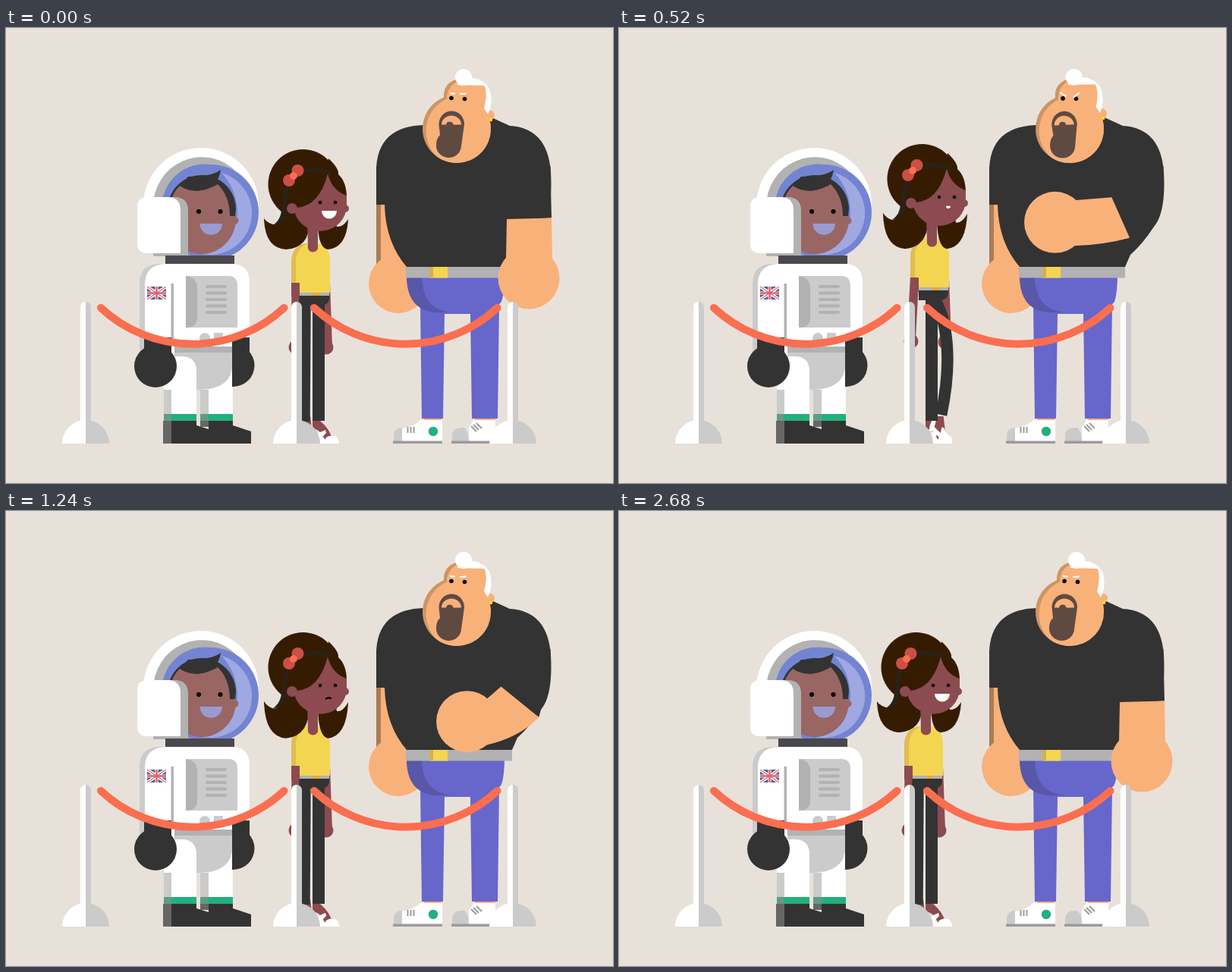
An HTML page that plays this animation: 800 px wide and 600 px high, repeating every 4 s.

```html
<!DOCTYPE html>
<html lang="en">
<head>
<meta charset="utf-8">
<title>Waiting in line</title>
<style>
html, body { margin: 0; width: 100%; height: 100%; overflow: hidden; background: #e8e1da; }
svg { display: block; width: 800px; height: 600px; }
.dark { fill: #333; } .white { fill: #fff; } .pale { fill: #cbcbcb; } .grey { fill: #b2b2b2; }
.tan { fill: #f9b17a; } .brown { fill: #8c4b50; } .hair { fill: #351c00; } .jeans { fill: #6766cb; }
.line { fill: none; }
</style>
</head>
<body>
<svg viewBox="0 0 800 600">
<defs>
  <clipPath id="flagClip"><path d="M186 341h25v17h-25z"/></clipPath>
  <clipPath id="faceClip"><circle cx="594" cy="133" r="45"/></clipPath>
  <clipPath id="visorClip"><path d="M173 150H340V301H173z"/></clipPath>
  <g id="post">
    <path class="white" d="M-31 548A31 31 0 0 1 0 517V548z"/>
    <path class="pale" d="M0 517A31 31 0 0 1 31 548H0z"/>
    <path class="white" d="M-7 548V368A7 7 0 0 1 0 361V548z"/>
    <path class="pale" d="M0 361A7 7 0 0 1 7 368V548H0z"/>
  </g>
  <path id="rope" class="line" d="M0 369A176.500 176.500 0 0 0 241.500 369" stroke="#fb6e50" stroke-width="10" stroke-linecap="round"/>
</defs>

<g id="astronaut">
  <g clip-path="url(#visorClip)">
    <circle class="white" cx="257" cy="234" r="76"/>
    <path class="grey" d="M194 236A64 65 0 0 1 303 189L270 301H194z"/>
    <circle cx="270" cy="243" r="63" fill="#7384d2"/>
    <circle cx="262" cy="236" r="56.500" fill="#7384d2"/>
    <path d="M284 191A55 55 0 0 1 254 297Q304 285 305 243Q304 212 284 191z" fill="#a0a8e2"/>
    <circle class="dark" cx="258" cy="239" r="45"/>
    <g fill="#996663">
      <path d="M213 254Q214 222 229 208Q252 222 279 206Q295 222 295 248H303A45 47 0 0 1 213 254z"/>
      <circle cx="302" cy="254" r="4.500"/>
    </g>
    <path class="dark" d="M240 196Q272 196 283 187Q281 199 274 207Q251 222 229 208z"/>
    <circle cx="254" cy="242" r="3"/><circle cx="282.500" cy="242" r="3"/>
    <path d="M255.500 258H285A14.500 14.500 0 0 1 255.500 258z" fill="#9a9bd0"/>
  </g>
  <path class="grey" d="M205 223H222Q240 223 240 241V301H205z"/>
  <path class="white" d="M186 223H215Q230 224 230 241V297H186Q173 297 173 284V236Q173 223 186 223z"/>
  <path d="M210 300H301V311H210z" fill="#49484c"/>
  <path class="pale" d="M208 311H200Q176 313 176 337V425H208z"/>
  <path class="white" d="M210 311H300Q321 313 321 335V420H298V432H183V337Q184 312 210 311z"/>
  <path class="grey" d="M217.500 337H221V410H217.500z"/>
  <g clip-path="url(#flagClip)">
    <path d="M186 341h25v17h-25z" fill="#525c93"/>
    <path d="M186 341l25 17M211 341l-25 17M198.500 341v17M186 349.500h25" stroke="#fff" stroke-width="4.200"/>
    <path d="M186 341l25 17M211 341l-25 17" stroke="#e0606b" stroke-width="1.200"/>
    <path d="M198.500 341v17M186 349.500h25" stroke="#e0606b" stroke-width="2.400"/>
  </g>
  <path class="pale" d="M237 327H293Q305 327 305 340V395H237z"/>
  <path class="grey" d="M237 327Q252 329 252 343V382Q252 395 237 395z"/>
  <path d="M265 341h24m-24 8.500h24m-24 8.500h24m-24 8.500h24m-24 8.500h24" stroke="#b2b2b2" stroke-width="4" stroke-linecap="round"/>
  <circle class="pale" cx="262" cy="409" r="7"/>
  <path class="pale" d="M274 402h12v12h-12z"/>
  <path class="grey" d="M222 420H298V428H222z"/>
  <path class="pale" d="M222 428H298V444Q296 475 265 477H222z"/>
  <path class="white" d="M208 433H233Q251 434 251 453V510H208zM256 477Q297 476 299 444V510H256z"/>
  <path class="pale" d="M208 477H218V510H208zM256 477H267V510H256z"/>
  <path d="M208 509H251V518H208zM256 509H299V518H256z" fill="#22b07d"/>
  <path d="M208 509H218V518H208zM256 509H267V518H256z" fill="#5f9c85"/>
  <path class="dark" d="M207 518H251V524L267 529V548H207zM256 518H299V524L323 532V548H267V526L256 526z"/>
  <path d="M207 518H218V548H207zM256 518H267V526L256 526z" fill="#666"/>
  <path class="dark" d="M182 408H218V440H182zM298 408H321V440H298z"/>
  <circle class="dark" cx="197" cy="446" r="28"/>
  <path class="dark" d="M298 417H299.500A28 28 0 0 1 299.500 473H298z"/>
</g>

<g id="woman">
  <g id="rightArm"><path class="brown" d="M418 336H427L430 420H415z"/><circle class="brown" cx="422" cy="421" r="9.500"/></g>
  <path id="leftArm" class="line" stroke="#8c4b50" stroke-width="11.500"/>
  <circle id="leftHand" class="brown" r="9.500"/>
  <path class="brown" d="M404 518H414Q428 530 430 543L421 545Q416 530 404 528z"/>
  <path class="white" d="M408 548V541Q409 535 414 533L421 530L422 534L416 540Q424 543 425 548z"/>
  <path class="white" d="M421 548V541Q426 536 434 538Q439 541 439 548z"/>
  <g id="crossFoot">
    <path class="brown" d="M387 512H401L404 538L400 545L391 530z"/>
    <path class="white" d="M382 531Q383 520 388 515H392L389 526L397 534L399 526L402 528Q405 536 412 540V548H399Q394 535 385 531z"/>
  </g>
  <path class="dark" d="M404 355H420V518H404z"/>
  <path id="crossLeg" class="line" stroke="#333" stroke-width="15.500"/>
  <g id="womanTop">
    <path class="dark" d="M387 352H426V358Q424 366 414 366H387z"/>
    <path fill="#f4d552" d="M376 349V308Q377 286 397 284H411Q426 287 427 306V349z"/>
    <path fill="#dfbd51" d="M376 336V308Q377 286 397 284Q382 292 382 308V349H376z"/>
    <path class="brown" d="M376 336H387V354H376z"/>
    <path class="grey" d="M387 349H426V353H387z"/><path d="M406 349h7v4h-7z" fill="#f5a623"/>
    <circle class="hair" cx="391.500" cy="206" r="46"/>
    <path id="curls" class="hair" d="M368 215Q368 260 352 259Q344 257 340 251Q341 290 369 292Q400 290 400 255H411Q411 290 424 292Q449 290 451 252Q444 263 436 262L425 210z"/>
    <path class="hair" d="M425 172Q439 185 438 193Q449 203 449 224L420 225z"/>
    <path class="brown" d="M397 250H411V291A7 7 0 0 1 398 291z"/>
    <path class="brown" d="M383 237Q413 235 424 192Q429 214 449 221V235A35 34 0 0 1 381 245z"/>
    <circle class="brown" cx="377" cy="238" r="7"/><circle class="brown" cx="447" cy="238" r="5"/>
    <path class="line" d="M367 244Q364 215 380 195Q402 181 427 192" stroke="#29211b" stroke-width="5"/>
    <path d="M363 240H369Q369 259 352 260Q362 253 363 240z" fill="#29211b"/>
    <g fill="#cb4f44"><circle cx="384.500" cy="188" r="8"/><circle cx="373" cy="201" r="8"/></g>
    <circle cx="379" cy="195" r="5" fill="#fb6e50"/>
    <circle cx="414" cy="230" r="2.300"/><circle cx="434" cy="230" r="2.300"/>
    <path id="smile" class="white" d="M-10 -1H10A10 10.500 0 0 1 -10 -1z"/>
    <ellipse id="gasp" cx="425.500" cy="246.500" rx="3.800" ry="3.400"/>
    <path id="frown" class="line" d="M421 248Q425 245 429 247.500" stroke="#000" stroke-width="2"/>
  </g>
</g>

<g id="bouncer">
  <path class="tan" d="M488 233H540V337H488z"/><path d="M488 233H494V312H488z" fill="#a97c55"/>
  <circle class="tan" cx="517" cy="337" r="39"/>
  <path class="tan" d="M551 513h23v6h-23zM618 513h27v6h-27z"/>
  <path class="jeans" d="M528 329H657Q656 362 650 364L648 515H614L612 377H578L576 515H548L546 366Q530 355 528 329z"/>
  <path d="M528 329H548Q549 372 588 375H577Q529 378 528 329z" fill="#5857a8"/>
  <path class="dark" d="M488 233V184Q491 130 550 128L640 118L664 129Q714 132 718 190Q721 243 705 262Q690 285 674 299L667 315H528Q500 282 499 233z"/>
  <path class="grey" d="M527 315H667V329.500H527z"/>
  <path d="M558 315h24v14.500h-24z" fill="#f4d552"/><path d="M558 315h5v14.500h-5z" fill="#d2b04b"/>
  <path class="white" d="M522 545V528Q538 525 546 517H575V545zM610 545V527L616 517H645V545z"/>
  <path class="pale" d="M511 545V537Q512 527 522 527V545zM588 545V537Q589 527 600 527H604Q610 532 610 545z"/>
  <path d="M510 544.500h65v3.500h-65zM587 544.500h51v3.500h-51z" fill="#9b9b9f"/>
  <path d="M529.500 526v8m4 -8v8m4 -8v8M613 525l7 7m-4 -9l7 7m-3 -9l7 7" stroke="#9b9b9f" stroke-width="2"/>
  <circle cx="563" cy="532" r="6.200" fill="#22b07d"/>
  <g id="head">
    <path d="M577 108V88Q578 70 600 66L612 110z" fill="#cc9563"/>
    <circle cx="594" cy="133" r="45" fill="#cc9563"/>
    <circle class="tan" cx="600" cy="136" r="46.500" clip-path="url(#faceClip)"/>
    <path class="tan" d="M581 105V90Q583 74 600 68H626Q638 85 636 118z"/>
    <circle class="tan" cx="637.500" cy="115" r="6.500"/>
    <path class="white" d="M594 75L603 66Q627 63 637 80Q643 98 635 114L630 106Q635 88 631 76z"/>
    <circle class="white" cx="603" cy="65" r="11"/>
    <circle cx="639" cy="121" r="2.200" fill="#ffe100"/>
    <path d="M570.500 127A16.700 17.500 0 0 1 604 127L600 156A16.500 16 0 0 1 567 154Q567 146 572 141z" fill="#5f4a42"/>
    <path class="tan" d="M574 127.500A13 12 0 0 1 600 127.500H589.500A4.800 4.800 0 0 0 580 127.500z"/>
    <circle cx="587" cy="92.500" r="2.800"/><circle cx="604.500" cy="93.500" r="2.800"/>
    <path id="brows" class="line" stroke="#fff" stroke-width="2.200"/>
  </g>
  <path id="sleeve" class="dark"/>
  <path id="forearm" class="tan"/>
  <circle id="fist" class="tan" r="40.500"/>
</g>

<use href="#post" x="105"/><use href="#post" x="383"/><use href="#post" x="668"/>
<use href="#rope" x="125"/><use href="#rope" x="406"/>
</svg>
<script>
const LOOP = 4000, STEP = 40;
const el = id => document.getElementById(id);
const set = (id, attrs) => { for (const k in attrs) el(id).setAttribute(k, attrs[k]); };
const show = (id, visible) => { el(id).style.display = visible ? '' : 'none'; };
const mix = (a, b, f) => a + (b - a) * f;
const mixPoint = (a, b, f) => [mix(a[0], b[0], f), mix(a[1], b[1], f)];
const add = (a, b) => [a[0] + b[0], a[1] + b[1]];
const ramp = (t, from, to) => {
  const x = Math.min(1, Math.max(0, (t - from) / (to - from)));
  return x * x * (3 - 2 * x);
};
// Eases from 0 to 1, holds, then eases back to 0.
const outAndBack = (t, a, b, c, d) => ramp(t, a, b) - ramp(t, c, d);

function poseWoman(t) {
  const lean = outAndBack(t, 230, 530, 970, 1180);
  const P = (rest, moved) => mixPoint(rest, moved, lean);
  const shift = `translate(${8 * lean} ${-7 * lean})`;
  set('womanTop', { transform: shift });
  set('rightArm', { transform: shift });
  const hand = P([382, 421], [385, 413]);
  set('leftArm', { d: `M${P([382, 330], [390, 323])}L${hand}` });
  set('leftHand', { cx: hand[0], cy: hand[1] });

  // The curls droop for a moment after each move.
  const droop = outAndBack(t, 320, 440, 460, 660) + outAndBack(t, 1050, 1210, 1220, 1420);
  set('curls', { transform: `translate(0 252) scale(1 ${1 + .2 * droop}) translate(0 -252)` });

  const cross = outAndBack(t, 240, 540, 970, 1140);
  const C = (rest, crossed) => mixPoint(rest, crossed, cross);
  set('crossLeg', {
    d: `M${P([394, 354], [412, 351])}C${C([394, 400], [436, 385])} ${C([393, 460], [439, 445])} ${C([393, 519], [425, 510])}`
  });
  set('crossFoot', { transform: `translate(${27 * cross} 0)` });

  const smile = t < 1000 ? 1 - ramp(t, 450, 560) : Math.min(1, Math.max(0, (t - 2520) / 160));
  show('smile', smile > 0);
  set('smile', { transform: `translate(426 242) scale(${smile})` });
  show('gasp', t >= 540 && t < 1160);
  show('frown', t >= 1160 && t < 2560);
}

function poseBouncer(t) {
  const turn = t < 900 ? ramp(t, 370, 680) : 1 - ramp(t, 1010, 1230);
  set('head', { transform: `rotate(${-6 * turn} 594 133)` });
  const anger = outAndBack(t, 300, 500, 1040, 1230);
  const B = (calm, angry) => mixPoint(calm, angry, anger);
  set('brows', {
    d: `M${B([585, 86], [584, 84.5])}L${B([592, 86.5], [591.5, 90])}M${B([598, 87], [601, 92])}L${B([606.5, 86.5], [609, 86])}`
  });

  const bend = outAndBack(t, 240, 594, 1100, 1440);
  const A = (rest, bent) => mixPoint(rest, bent, bend);
  const wristTurn = Math.min(1, bend * 1.6);
  const fist = A([689, 330], [560, 247]);
  const inner = A([660, 252], [648, 219.5]);
  const outer = mixPoint(A([719, 250.5], [737, 273]), A([737, 273], [656, 278]), bend);
  const wristIn = add(fist, mixPoint([-30, -25], [25, -29], wristTurn));
  const wristOut = add(fist, mixPoint([31, -25], [25, 31], wristTurn));
  const bulge = 4 * bend * (1 - bend);
  const curve = add(mixPoint(outer, wristOut, .5), [10 * bulge, 9 * bulge]);
  set('sleeve', { d: `M640 180L717.5 182Q${A([718, 215], [719, 215])} ${outer}L${inner}z` });
  set('forearm', { d: `M${inner}L${outer}Q${curve} ${wristOut}L${fist}L${wristIn}z` });
  set('fist', { cx: fist[0], cy: fist[1] });
}

function draw() {
  const t = Math.floor(performance.now() % LOOP / STEP) * STEP;
  poseWoman(t);
  poseBouncer(t);
  requestAnimationFrame(draw);
}
draw();
</script>
</body>
</html>
```
